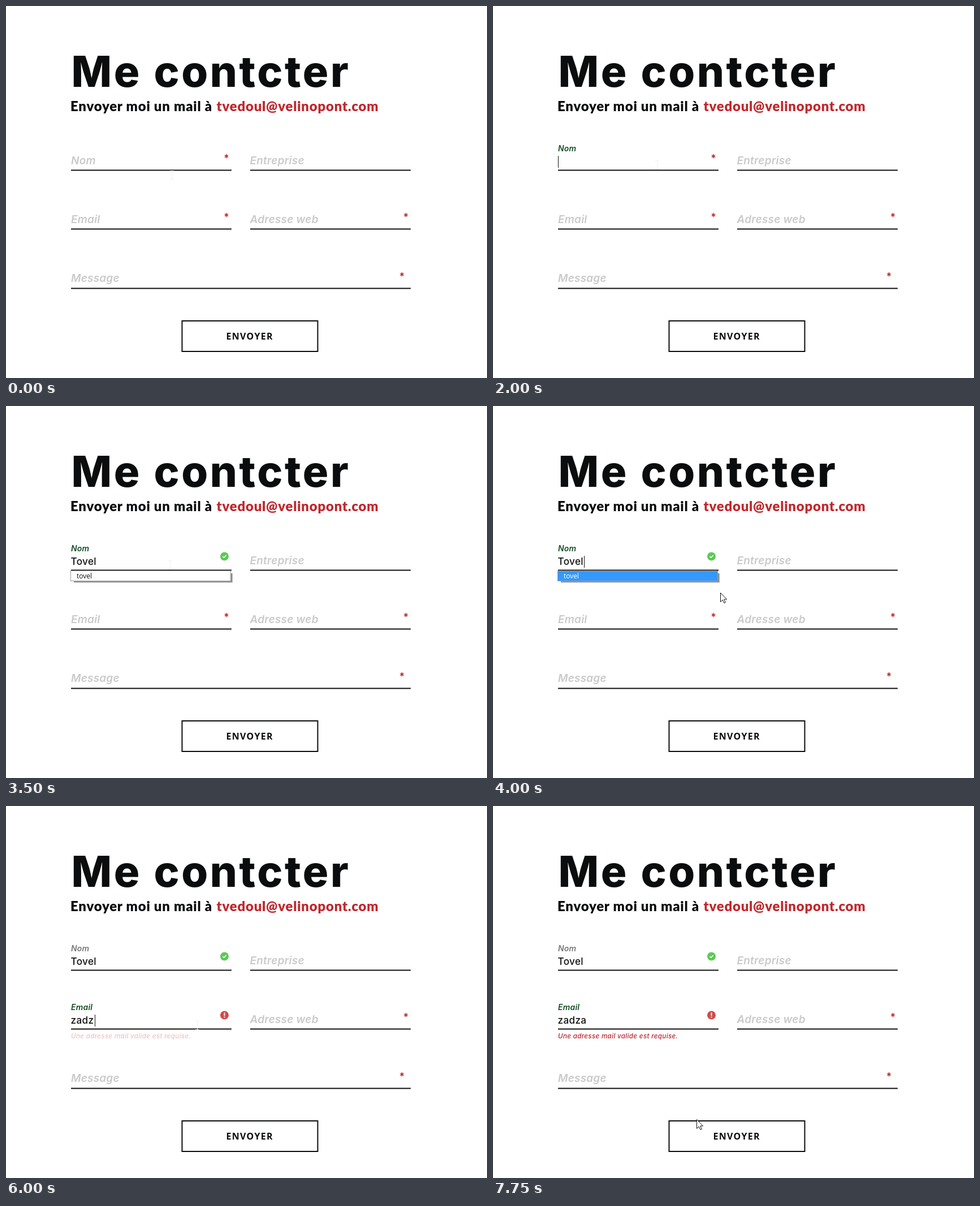
Animation of 851x658 px, one loop 8000 ms. Source, as an HTML page:

```html
<!DOCTYPE html>
<html lang="fr">
<head>
<meta charset="utf-8">
<title>Formulaire de contact</title>
<style>
  html, body { margin: 0; width: 100%; height: 100%; overflow: hidden; background: #fff; }
  svg { display: block; width: 851px; height: 658px; }
  text { font-family: Inter, sans-serif; white-space: pre; }
  .title { font-size: 76px; font-weight: 800; letter-spacing: 3.5px; fill: #0b0c0d; }
  .sub { font: 900 24px Lato, sans-serif; letter-spacing: .75px; fill: #0b0c0d; }
  .mail { fill: #c1272d; }
  .label { font-size: 19px; font-weight: 600; font-style: italic; letter-spacing: .2px; fill: #cacaca; }
  .value { font-size: 17.2px; font-weight: 500; letter-spacing: .3px; fill: #111; }
  .star { font: 900 20px Lato, sans-serif; text-anchor: middle; fill: #c1272d; }
  .error { font-size: 11.6px; font-weight: 500; font-style: italic; letter-spacing: .33px; fill: #b8202a; }
  .send { font: 700 16px "Open Sans", sans-serif; letter-spacing: 1.3px; fill: #0b0c0d; }
  .item { font: 12px "Open Sans", sans-serif; fill: #111; }
  .rule { fill: #111; }
  .caret { fill: #111; }
</style>
</head>
<body>
<svg viewBox="0 0 851 658">
  <text class="title" x="115.5" y="143">Me</text>
  <text class="title" x="261.5" y="143">contcter</text>
  <text class="sub" x="114" y="186">Envoyer moi un mail à</text>
  <text class="sub mail" x="372.5" y="186">tvedoul@velinopont.com</text>

  <g class="rule">
    <rect x="115" y="289.5" width="284" height="2"/>
    <rect x="432" y="289.5" width="284" height="2"/>
    <rect x="115" y="393.5" width="284" height="2"/>
    <rect x="432" y="393.5" width="284" height="2"/>
    <rect x="115" y="498.5" width="601" height="2"/>
  </g>

  <text class="label" x="431.5" y="280">Entreprise</text>
  <text class="label" x="431.5" y="384">Adresse web</text>
  <text class="label" x="115" y="488">Message</text>
  <text class="star" x="707.5" y="382">*</text>
  <text class="star" x="700.5" y="487">*</text>

  <rect x="311.5" y="557" width="240" height="54" fill="none" stroke="#0b0c0d" stroke-width="2"/>
  <text class="send" x="389.5" y="589.5">ENVOYER</text>

  <g id="fields"></g>
  <text class="error" id="error" x="115" y="411">Une adresse mail valide est requise.</text>
  <g id="list"></g>
  <path id="beam" d="M-3.5 -7.5H3.5M0 -7.5V7.5M-3.5 7.5H3.5" fill="none" stroke="#f0f0f0"/>
  <path id="arrow" d="M.5 .5V16.5L4.3 13L7 18.6L9.4 17.5L6.8 12H11.5Z" fill="#fff" stroke="#111"/>
</svg>
<script>
const LOOP = 8000;
const $ = id => document.getElementById(id);
const GREY = '#cacaca', MID = '#86a08c', GREEN = '#124d22', BLUR = '#777';

function add(parent, tag, attrs, text = '') {
  const el = document.createElementNS('http://www.w3.org/2000/svg', tag);
  for (const k in attrs) el.setAttribute(k, attrs[k]);
  el.textContent = text;
  return parent.appendChild(el);
}

// One animated field; dy shifts it from the first row.
function makeField(name, dy) {
  const g = add($('fields'), 'g', { transform: `translate(0 ${dy})` });
  const label = add(g, 'text', { class: 'label', x: 115 }, name);
  const star = add(g, 'text', { class: 'star', x: 390, y: 278 }, '*');
  const value = add(g, 'text', { class: 'value', x: 114.5, y: 281 });
  const caret = add(g, 'rect', { class: 'caret', y: 265, width: 1, height: 21 });
  const icon = add(g, 'g', { transform: 'translate(386.5 266)' });
  const disc = add(icon, 'circle', { r: 7.5 });
  const mark = add(icon, 'path', { fill: 'none', stroke: '#fff' });

  return s => {
    label.setAttribute('y', 280 - 23 * s.up);
    label.style.fontSize = 19 - 5 * s.up + 'px';
    label.style.fill = s.ink;
    value.textContent = s.text;
    const width = s.text ? value.getComputedTextLength() + 1 : 0;
    caret.setAttribute('x', Math.round(115 + width));
    caret.style.display = s.caret ? '' : 'none';
    star.style.display = s.text ? 'none' : '';
    icon.style.display = s.text ? '' : 'none';
    disc.setAttribute('fill', s.ok ? '#5cc956' : '#cf4b4b');
    mark.setAttribute('d', s.ok ? 'M-3 .2L-.9 2.2L3.2 -2' : 'M0 -4.5V1M0 2.4V4.4');
    mark.setAttribute('stroke-width', s.ok ? 1.6 : 2);
  };
}

function drawList(items, hot) {
  const g = $('list');
  g.replaceChildren();
  if (!items.length) return;
  const h = 19 + 17.8 * (items.length - 1);
  add(g, 'rect', { x: 120, y: 296, width: 281, height: h - 2.5, fill: '#b5b5b5' });
  add(g, 'rect', { x: 120, y: 296, width: 280, height: h - 3.5, fill: '#8c8c8c' });
  add(g, 'rect', { x: 114.5, y: 291.5, width: 283, height: h - 1, fill: '#fff', stroke: '#9a9a9a' });
  if (hot) add(g, 'rect', { x: 115, y: 292, width: 282, height: 17, fill: '#3399ff' });
  items.forEach((word, i) => {
    const el = add(g, 'text', { class: 'item', x: 125, y: 304.7 + 17.8 * i }, word);
    if (hot) el.style.fill = '#fff';
  });
}

const drawName = makeField('Nom', 0);
const drawEmail = makeField('Email', 104);

const empty = { up: 0, ink: GREY, text: '', caret: false, ok: false };
const start = { name: empty, email: empty, list: [], hot: false, error: 0, beam: [293.5, 299], arrow: null };

// Each step: time in ms, then what changes.
const steps = [
  [0, {}],
  [250, { beam: [292.5, 292] }],
  [500, { beam: [290.5, 281] }],
  [750, { name: { up: .5, ink: MID, caret: true } }],
  [1000, { name: { up: 1, ink: GREEN } }],
  [1500, { name: { caret: false } }],
  [2000, { name: { caret: true } }],
  [2250, { name: { text: 'T' }, list: ['tovel', 'test', 'tata', 'tutu', 'tres', 'titre'] }],
  [2500, { name: { text: 'To' }, list: ['tovel'] }],
  [2750, { name: { text: 'Tove', ok: true } }],
  [3000, { name: { text: 'Tovel' } }],
  [3500, { name: { caret: false } }],
  [3750, { beam: null, arrow: [366, 304], hot: true }],
  [4000, { name: { caret: true }, arrow: [402, 330] }],
  [4250, { name: { caret: false, ink: BLUR }, list: [], hot: false, arrow: [392, 332] }],
  [4500, { arrow: null, beam: [338.5, 342] }],
  [4750, { beam: [338.5, 368] }],
  [5000, { beam: [338.5, 388] }],
  [5500, { email: { up: .5, ink: MID, caret: true } }],
  [5750, { email: { up: 1, ink: GREEN, text: 'za' } }],
  [6000, { email: { text: 'zadz' }, error: .27 }],
  [6250, { email: { text: 'zadza' }, error: 1 }],
  [6750, { email: { caret: false } }],
  [7000, { beam: null, arrow: [341, 408] }],
  [7250, { email: { caret: true }, arrow: [347, 452] }],
  [7500, { arrow: [355, 515] }],
  [7750, { email: { caret: false }, arrow: [360, 554] }]
];

let last = start;
const scenes = steps.map(([at, change]) => {
  last = {
    ...last, ...change, at,
    name: { ...last.name, ...change.name },
    email: { ...last.email, ...change.email }
  };
  return last;
});

function place(el, pos) {
  el.style.display = pos ? '' : 'none';
  if (pos) el.setAttribute('transform', `translate(${pos})`);
}

function draw(s) {
  drawName(s.name);
  drawEmail(s.email);
  drawList(s.list, s.hot);
  $('error').style.opacity = s.error;
  place($('beam'), s.beam);
  place($('arrow'), s.arrow);
}

let shown;
function tick() {
  const t = performance.now() % LOOP;
  const scene = scenes.findLast(s => s.at <= t);
  if (scene !== shown) draw(shown = scene);
  requestAnimationFrame(tick);
}
tick();
</script>
</body>
</html>
```
